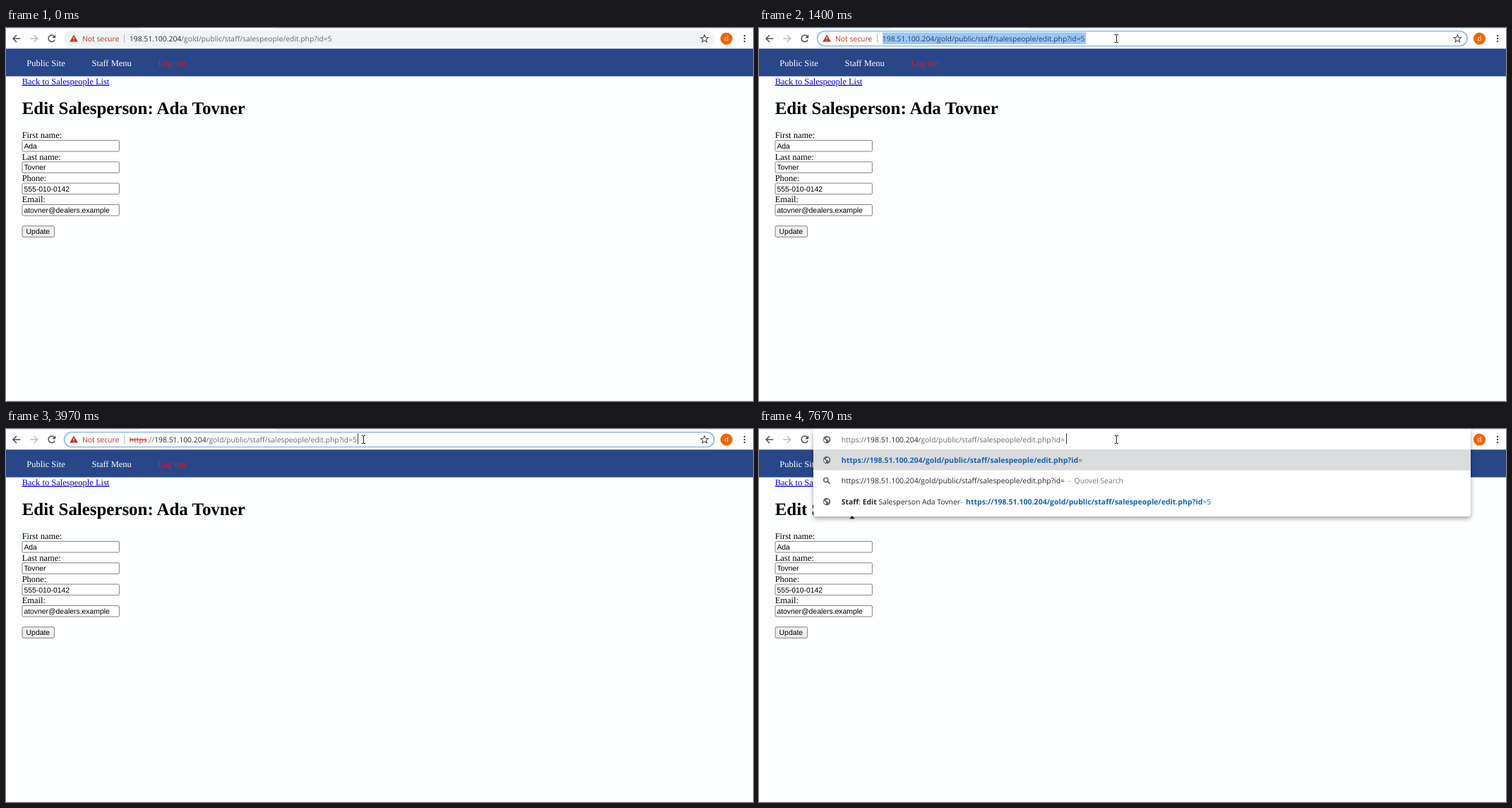
An HTML page that plays this animation: 1058x529 px, repeating every 8 s.

```html
<!DOCTYPE html>
<html lang="en">
<head>
<meta charset="utf-8">
<title>Edit Salesperson</title>
<style>
  html, body { margin: 0; width: 100%; height: 100%; overflow: hidden; background: #fdfefe; }
  svg { display: block; width: 100%; height: 100%; }
  text { text-rendering: geometricPrecision; white-space: pre; }

  .page text { font: 12.48px "Liberation Serif", serif; }
  .page .title { font-size: 24.9px; font-weight: bold; }
  .page .link { fill: #00e; text-decoration: underline; }
  .page .field { font: 10.4px "Liberation Sans", sans-serif; }
  .box { fill: #fff; stroke: #767676; stroke-width: .9; }

  .ui { font: 10.36px "Open Sans", sans-serif; fill: #666a6e; }
  .host, .dark { fill: #26282b; }
  .red { fill: #c5301f; }
  .blue { fill: #1464bd; }
  .bold { font-weight: 700; }
  .blue .bold { font-size: 10.53px; }
  .strike { text-decoration: line-through; }
  .line { fill: none; stroke: #4d5156; stroke-width: 1.5; }

  /* Hard cuts on an 8 s loop */
  .cut { animation: 8s step-end infinite; opacity: 0; }
  #bar { animation: bar 8s step-end infinite; }
  #arrow { animation-name: arrow; }
  #beam { animation-name: beam; }
  #glow { animation-name: glow; }
  #idle { animation-name: idle; }
  #selected { animation-name: selected; }
  #editing { animation-name: editing; }
  #menu { animation-name: menu; }
  #caret1 { animation-name: caret1; }
  #caret2 { animation-name: caret2; }

  @keyframes bar {
    0% { fill: #f1f3f4; stroke: #f1f3f4; }
    8% { fill: #e8eaeb; stroke: #e8eaeb; }
    17.5%, 100% { fill: #fff; stroke: #8db7ee; }
  }
  @keyframes arrow {
    0% { opacity: 0; transform: translate(772px, 349px); }
    3.125% { opacity: 1; transform: translate(772px, 349px); }
    5% { opacity: 1; transform: translate(567px, 62px); }
    8%, 100% { opacity: 0; transform: translate(567px, 62px); }
  }
  @keyframes beam { 0% { opacity: 0 } 8%, 100% { opacity: 1 } }
  @keyframes glow { 0% { opacity: 0 } 12.625% { opacity: 1 } 17.5%, 100% { opacity: 0 } }
  @keyframes idle { 0% { opacity: 1 } 17.5%, 100% { opacity: 0 } }
  @keyframes selected { 0% { opacity: 0 } 17.5% { opacity: 1 } 31.125%, 100% { opacity: 0 } }
  @keyframes editing { 0% { opacity: 0 } 31.125% { opacity: 1 } 68.375%, 100% { opacity: 0 } }
  @keyframes menu { 0% { opacity: 0 } 68.375%, 100% { opacity: 1 } }
  @keyframes caret1 { 0% { opacity: 1 } 40.375% { opacity: 0 } 49.625%, 100% { opacity: 1 } }
  @keyframes caret2 {
    0% { opacity: 1 } 72.875% { opacity: 0 } 77.375% { opacity: 1 }
    82.125% { opacity: 0 } 95.875%, 100% { opacity: 1 }
  }
</style>
</head>
<body>
<svg viewBox="0 0 1058 529">
  <defs>
    <filter id="shadow" x="-5%" y="-15%" width="110%" height="140%">
      <feDropShadow dx="0" dy="3" stdDeviation="3.2" flood-color="#000" flood-opacity=".36"/>
    </filter>
    <g id="globe">
      <circle r="5.2" fill="#5f6368"/>
      <path d="M-4-1.5L-1 1.4V3.9A4 4 0 0 1-4-1.5M.8-4V-2.4H-1.2V-.6H1.6V1.6H3A4 4 0 0 0 .8-4" fill="#fff"/>
    </g>
  </defs>

  <g class="page">
    <rect width="1058" height="529" fill="#fdfefe"/>
    <rect y="528" width="1058" height="1" fill="#eceeef"/>
    <rect y="29" width="1058" height="39.5" fill="#284688"/>
    <g fill="#fff">
      <text x="29.3" y="54">Public Site</text>
      <text x="121.5" y="54">Staff Menu</text>
      <text x="215.5" y="54" fill="#e9151f">Log out</text>
    </g>
    <text class="link" x="22.7" y="79.8">Back to Salespeople List</text>
    <text class="title" x="22.7" y="121.6">Edit Salesperson: Ada Tovner</text>

    <text x="22.7" y="156.3">First name:</text>
    <text x="22.7" y="186.6">Last name:</text>
    <text x="22.7" y="217">Phone:</text>
    <text x="22.7" y="247.3">Email:</text>
    <g class="box">
      <rect x="23" y="159.4" width="137.4" height="15.6" rx="1.5"/>
      <rect x="23" y="189.8" width="137.4" height="15.6" rx="1.5"/>
      <rect x="23" y="220.1" width="137.4" height="15.6" rx="1.5"/>
      <rect x="23" y="250.5" width="137.4" height="15.6" rx="1.5"/>
      <rect x="23" y="280.8" width="45.6" height="15.6" rx="2" style="fill:#efefef"/>
    </g>
    <text class="field" x="25.4" y="171">Ada</text>
    <text class="field" x="25.4" y="201.3">Tovner</text>
    <text class="field" x="25.4" y="231.6">555-010-0142</text>
    <text class="field" x="25.4" y="262">atovner@dealers.example</text>
    <text class="field" x="28.6" y="292.4">Update</text>
  </g>

  <g class="ui">
    <rect width="1058" height="29" fill="#fff"/>
    <path d="M0 .4H187M381 .4H1058" stroke="#dee1e6" stroke-width=".8"/>
    <path d="M0 29H1058" stroke="#d5d9e2" stroke-width=".8"/>
    <path class="line" d="M20.3 15H10.2M15 10L10 15L15 20"/>
    <path class="line" d="M34.3 15H44.4M39.6 10L44.6 15L39.6 20" style="stroke:#bcbfc2"/>
    <path class="line" d="M68.6 12A4.7 4.7 0 1 0 69.2 16.4"/>
    <path d="M70.2 9.4V14.3H65.3Z" fill="#4d5156"/>

    <rect id="bar" x="82.5" y="4.5" width="920.5" height="21" rx="10.5" fill="#f1f3f4" stroke-width="1.6"/>
    <path d="M96 9.6L101.8 19.6H90.2Z" class="red"/>
    <path d="M96 13V16.2M96 17.2V18.4" stroke="#fff" stroke-width="1.1"/>
    <text class="red" x="108" y="18.8">Not secure</text>
    <path d="M167.5 9V21" stroke="#b5b8bb"/>
    <path class="line" d="M989.3 9.8L990.8 13.3L994.6 13.6L991.7 16.1L992.6 19.8L989.3 17.8L986 19.8L986.9 16.1L984 13.6L987.8 13.3Z" style="stroke-width:1.1"/>
    <circle cx="1020.4" cy="15" r="8.6" fill="#ef6605"/>
    <text x="1020.4" y="18.2" fill="#fff" text-anchor="middle" font-size="9.5">d</text>
    <g fill="#4d5156">
      <circle cx="1046" cy="10.9" r="1.25"/><circle cx="1046" cy="15" r="1.25"/><circle cx="1046" cy="19.1" r="1.25"/>
    </g>

    <circle id="glow" class="cut" cx="504.7" cy="14.3" r="9.3" fill="#f4ee72"/>
    <text id="idle" class="cut" x="174.8" y="18.8"><tspan class="host">198.51.100.204</tspan>/gold/public/staff/salespeople/edit.php?id=5</text>

    <g id="selected" class="cut">
      <rect x="175" y="6.3" width="288" height="16.7" fill="#9ac8fb"/>
      <text x="174.8" y="18.8" fill="#2c4159">198.51.100.204/gold/public/staff/salespeople/edit.php?id=5</text>
    </g>

    <g id="editing" class="cut">
      <text x="174.8" y="18.8"><tspan class="red strike">https</tspan>://<tspan class="host">198.51.100.204</tspan>/gold/public/staff/salespeople/edit.php?id=5</text>
      <rect id="caret1" class="cut" x="498" y="6" width="1" height="15" fill="#333"/>
    </g>

    <g id="menu" class="cut">
      <path d="M77 0H1008V119Q1008 124 1003 124H82Q77 124 77 119Z" fill="#fff" filter="url(#shadow)"/>
      <rect x="77" y="29" width="931" height="29.5" fill="#dadbdc"/>
      <use href="#globe" x="96" y="15"/>
      <use href="#globe" x="96" y="44"/>
      <use href="#globe" x="96" y="103"/>
      <path class="line" d="M97.2 74.6L100.6 78" style="stroke-width:1.4"/>
      <circle class="line" cx="94.8" cy="72.2" r="3.1" style="stroke-width:1.3"/>

      <text x="116.8" y="18.8">https://<tspan class="host">198.51.100.204</tspan>/gold/public/staff/salespeople/edit.php?id=</text>
      <rect id="caret2" class="cut" x="435" y="6" width="1" height="15" fill="#333"/>

      <text class="blue" x="116.8" y="47.8"><tspan class="bold">https://198.51.100.204/gold/public/staff/salespeople/edit.php?id</tspan>=</text>

      <text class="dark" x="116.8" y="77.2">https://198.51.100.204/gold/public/staff/salespeople/edit.php?id=</text>
      <text x="438" y="77.2" fill="#74787c">-</text>
      <text x="446.6" y="77.2" fill="#74787c">Quovel Search</text>

      <text class="dark" x="116.8" y="106.8"><tspan class="bold">Staff</tspan>: <tspan class="bold">Edit</tspan></text>
      <text class="dark" x="169.5" y="106.8">Salesperson Ada Tovner</text>
      <text x="285.5" y="106.8">-</text>
      <text class="blue" x="293" y="106.8"><tspan class="bold">https://198.51.100.204/gold/public/staff/salespeople/edit.php?id</tspan>=5</text>
    </g>
  </g>

  <path id="arrow" class="cut" d="M.5.6V12.4L3.2 9.9L5.1 14.2L6.9 13.4L5 9.2H8.6Z" fill="#fff" stroke="#000" stroke-width=".8"/>
  <path id="beam" class="cut" d="M503.6 9.5H505.5L506.3 10.2L507.1 9.5H509M506.3 10V20M503.6 20.5H505.5L506.3 19.8L507.1 20.5H509" fill="none" stroke="#111"/>
</svg>
</body>
</html>
```
